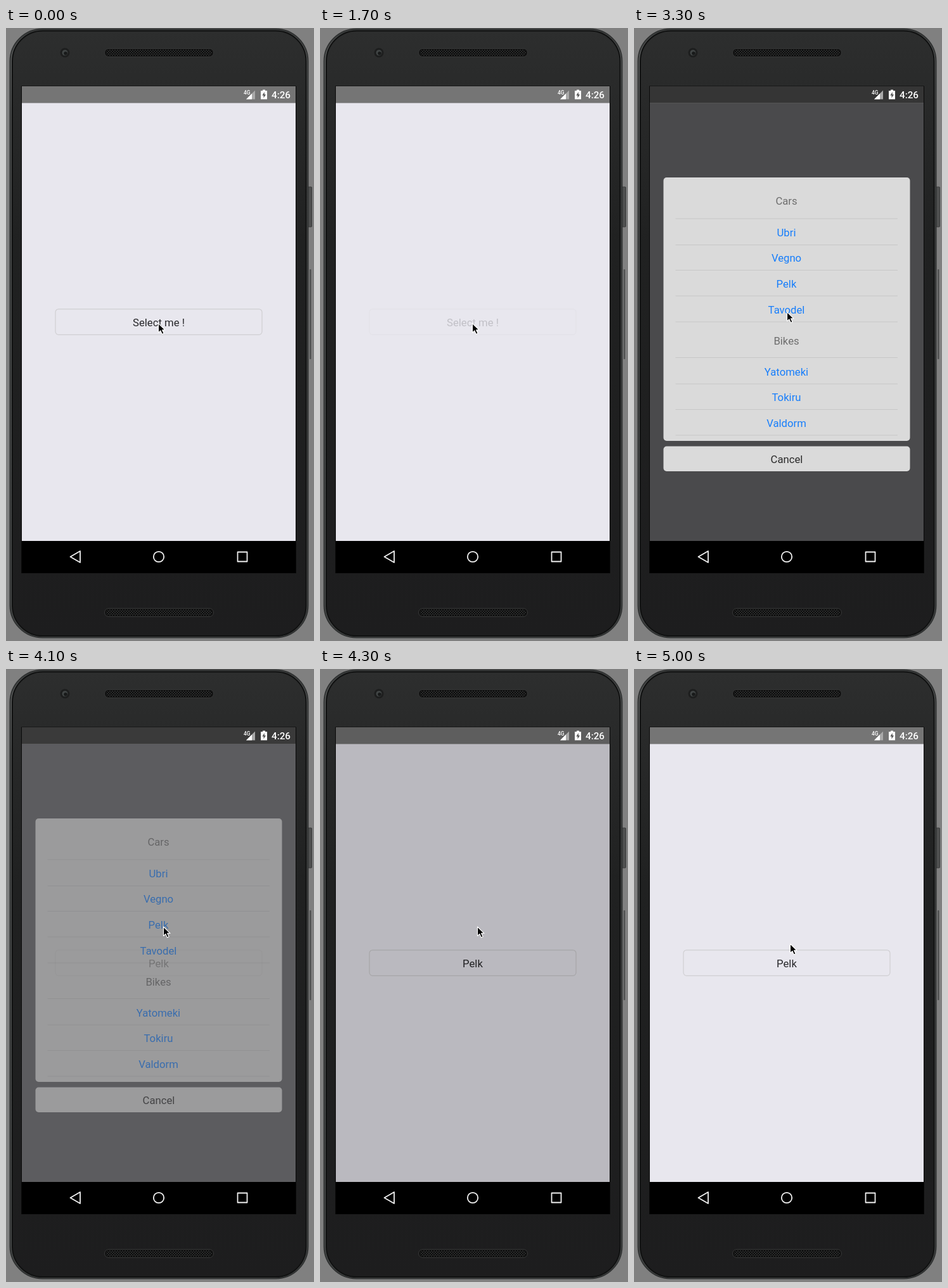
Write an HTML page that moves like this. It is 486 px wide and 968 px high and loops after 5.1 s.

```html
<!DOCTYPE html>
<html lang="en">
<head>
<meta charset="utf-8">
<title>Grouped picker</title>
<style>
  html, body { margin: 0; width: 100%; height: 100%; overflow: hidden; background: #808080; }
  svg { display: block; width: 486px; height: 968px; }
  text { font: 16.7px Roboto, sans-serif; }
  .label { text-anchor: middle; }
  .status { font-weight: 500; fill: #fff; }
</style>
</head>
<body>
<svg viewBox="0 0 486 968">
  <defs>
    <linearGradient id="face" x2="0" y2="1">
      <stop offset="0" stop-color="#2d2e2e"/>
      <stop offset=".1" stop-color="#292a2a"/>
      <stop offset=".35" stop-color="#202121"/>
      <stop offset="1" stop-color="#1d1d1e"/>
    </linearGradient>
    <linearGradient id="rim" x2="0" y2="1">
      <stop offset="0" stop-color="#3a3c3c"/>
      <stop offset=".04" stop-color="#5c5e5e"/>
      <stop offset=".15" stop-color="#4a4c4c"/>
      <stop offset="1" stop-color="#484a4a"/>
    </linearGradient>
    <pattern id="mesh" width="4" height="4" patternUnits="userSpaceOnUse">
      <rect width="4" height="4" fill="#292a2a"/>
      <circle cx="1" cy="1" r="1.1" fill="#070707"/>
      <circle cx="3" cy="3" r="1.1" fill="#070707"/>
    </pattern>
    <g id="speaker">
      <rect x=".5" y=".5" width="172" height="13" rx="6.5" fill="#111" stroke="#383939"/>
      <rect x="3" y="2" width="167" height="10" rx="5" fill="url(#mesh)"/>
    </g>
  </defs>

  <!-- Phone -->
  <rect width="486" height="968" fill="#808080"/>
  <rect x="476.5" y="251" width="6" height="63" rx="1" fill="#4f5050" stroke="#3a3b3b"/>
  <rect x="479" y="381" width="2.5" height="142" rx="1" fill="#505151"/>
  <rect x="6.5" y="1.5" width="470" height="961" rx="51" fill="url(#rim)" stroke="#303232" stroke-width="2"/>
  <rect x="10" y="4.5" width="463.5" height="955.5" rx="48" fill="url(#face)" stroke="#101111" stroke-width="2"/>
  <circle cx="93" cy="39" r="7.5" fill="#1d1e1e"/>
  <circle cx="93" cy="39" r="4.5" fill="#414545"/>
  <circle cx="94" cy="40" r="2.8" fill="#181a1a"/>
  <use href="#speaker" x="155" y="32"/>
  <use href="#speaker" x="155" y="916"/>

  <!-- Screen -->
  <rect x="24" y="91.5" width="434" height="769.5" fill="#090909"/>
  <rect x="25" y="92" width="432" height="27" fill="#757575"/>
  <rect x="25" y="118.5" width="432" height="691.5" fill="#e8e7ee"/>
  <g id="button">
    <rect x="78" y="443.8" width="326" height="40.5" rx="5" fill="none" stroke="#d0cfd2" stroke-width="1.2"/>
    <text id="choice" class="label" x="241" y="471" fill="#29292c"></text>
  </g>
  <rect id="pageDim" x="25" y="118.5" width="432" height="691.5"/>
  <rect id="statusDim" x="25" y="92" width="432" height="26.5"/>
  <g id="modal">
    <rect x="46.5" y="236" width="389" height="416" rx="5" fill="#dadada"/>
    <rect x="46.5" y="660.5" width="389" height="39.5" rx="5" fill="#dadada"/>
    <text class="label" x="241" y="687" fill="#2b2b2b">Cancel</text>
  </g>

  <!-- Status icons -->
  <text class="status" x="375" y="105" style="font-size:8.3px">4G</text>
  <path d="M379 112.5 393 98.500V112.500Z" fill="#a9a9a9"/>
  <path d="M379 112.5 388 103.500V112.500Z" fill="#fff"/>
  <path d="M405 97.500h4v1.500h3v13.500h-10V99h3Z" fill="#fff"/>
  <path d="M407.800 101 404.300 106.500h2.200v4l3.500-5.500h-2.200Z" fill="#555"/>
  <text class="status" x="419" y="111" style="font-size:15.2px">4:26</text>

  <!-- Navigation -->
  <rect x="25" y="810" width="432" height="50.500"/>
  <g fill="none" stroke="#f1f1f1" stroke-width="1.800" stroke-linejoin="round">
    <path d="M101.500 835 117 826V844Z"/>
    <circle cx="241" cy="835" r="8.200"/>
    <rect x="365.500" y="827.500" width="15" height="15"/>
  </g>

  <path id="cursor" d="M0 0V14.500L3.400 11.400 5.900 17 8.600 15.800 6.100 10.400H10.500Z"
    stroke="#fff" stroke-width="1.100" stroke-linejoin="round"/>
</svg>
<script>
  const LOOP = 5100, STEP = 100;
  const PICK = "Pelk";
  const el = id => document.getElementById(id);

  // Rows: text, baseline, separator below, heading
  const rows = [
    ["Cars", 279, 301, true],
    ["Ubri", 328.5, 342.5],
    ["Vegno", 369, 382.5],
    [PICK, 410, 423],
    ["Tavodel", 450.5, 464],
    ["Bikes", 499.5, 520.5, true],
    ["Yatomeki", 548.5, 562],
    ["Tokiru", 589, 602.5],
    ["Valdorm", 629.5, 643]
  ];
  el("modal").insertAdjacentHTML("beforeend", rows.map(([name, y, line, heading]) =>
    `<text class="label" x="240.5" y="${y}" fill="${heading ? "#6e6e6e" : "#177efb"}">${name}</text>
     <path d="M65.500 ${line}H416" stroke="#c7c7c7"/>`).join(""));

  // Keys: time, then values
  const cursorPath = [
    [0, 240.5, 466.5], [2600, 240.5, 466.5], [3200, 241.5, 448.5], [3300, 241.5, 448.5],
    [3800, 248.5, 407], [4700, 248.5, 407], [5000, 246.5, 434]
  ];
  const pageFade = [[2000, 0], [2100, .68], [4000, .68], [4100, .6], [4200, .45], [4300, .2], [4400, 0]];
  const statusFade = [[2000, 0], [2100, .2], [2300, .54], [4000, .54], [4100, .5], [4200, .45], [4300, .2], [4400, 0]];

  function sample(keys, t) {
    const i = keys.findIndex(key => key[0] > t);
    if (i < 0) return keys.at(-1).slice(1);
    if (i === 0) return keys[0].slice(1);
    const a = keys[i - 1], b = keys[i];
    const k = (t - a[0]) / (b[0] - a[0]);
    return a.slice(1).map((v, n) => v + (b[n + 1] - v) * k);
  }

  function draw(now) {
    const t = Math.floor((now % LOOP) / STEP) * STEP;
    el("choice").textContent = t < 4100 ? "Select me !" : PICK;
    el("button").setAttribute("opacity", t >= 1700 && t < 2100 ? .2 : 1);
    el("pageDim").setAttribute("opacity", sample(pageFade, t)[0]);
    el("statusDim").setAttribute("opacity", sample(statusFade, t)[0]);
    el("modal").setAttribute("opacity", t < 2100 || t >= 4200 ? 0 : t < 4100 ? 1 : .5);
    el("cursor").setAttribute("transform", `translate(${sample(cursorPath, t)})`);
  }

  const start = performance.now();
  function tick() {
    draw(performance.now() - start);
    requestAnimationFrame(tick);
  }
  tick();
</script>
</body>
</html>
```
